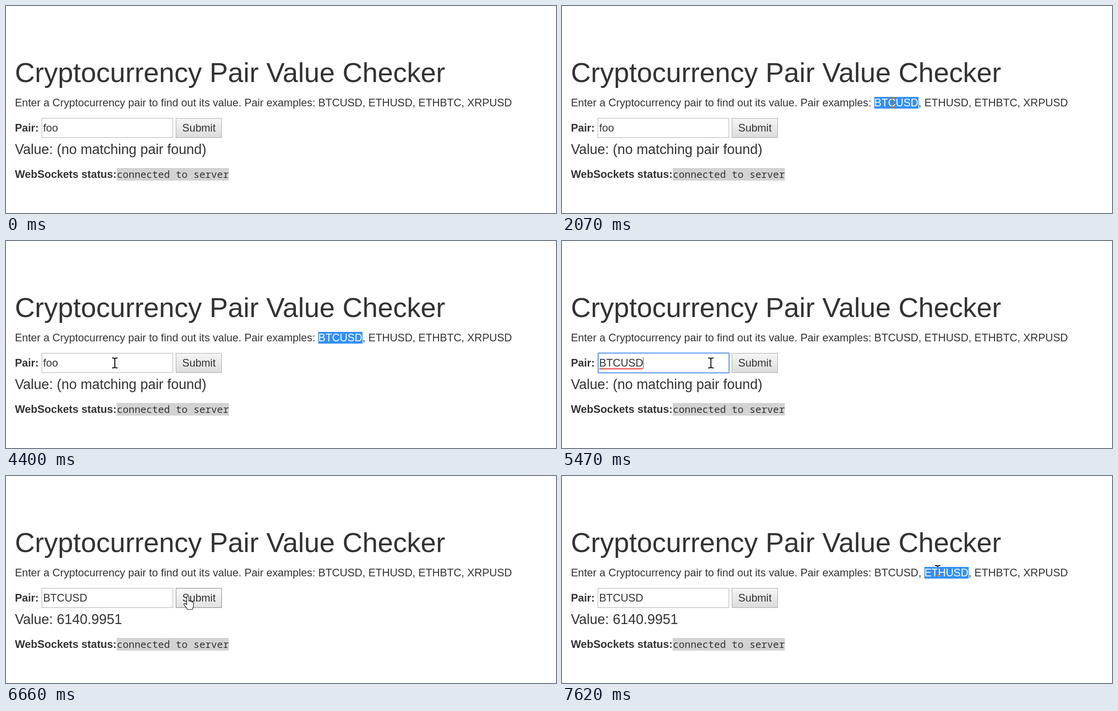
An HTML page for the animation above (8000 ms loop, 1218 px wide and 460 px high).

```html
<!DOCTYPE html>
<html lang="en">
<head>
<meta charset="utf-8">
<title>Pair value checker</title>
<style>
  html, body { margin: 0; width: 100%; height: 100%; overflow: hidden; background: #fff; }
  svg { display: block; width: 100%; height: 100%; }
  text { font: 23.75px "Liberation Sans", Arial, sans-serif; fill: #333; white-space: pre; }
  .title { font-size: 61.1px; }
  .value { font-size: 30.55px; }
  .bold { font-weight: bold; }
  .code { font: 21.75px "Noto Sans Mono", monospace; }
  .marked { fill: #fff; }
  .mark { fill: #3390ff; }
  .beam { fill: none; stroke: #000; stroke-width: 2; }
  .tint { stroke: #b8742c; }
</style>
</head>
<body>
<svg viewBox="0 0 1218 460">
  <defs>
    <linearGradient id="face" x2="0" y2="1">
      <stop stop-color="#f6f6f6"/><stop offset="1" stop-color="#dcdcdc"/>
    </linearGradient>
    <linearGradient id="faceHover" x2="0" y2="1">
      <stop stop-color="#f8f8f8"/><stop offset="1" stop-color="#e2e2e2"/>
    </linearGradient>
    <path id="beamShape" d="M-6-11h4l2 2l2-2h4M-6 11h4l2-2l2 2h4M0-9V9"/>
    <clipPath id="inside"><path id="insidePath"/></clipPath>
    <clipPath id="outside"><path id="outsidePath" clip-rule="evenodd"/></clipPath>
  </defs>

  <text class="title" x="19.7" y="169">Cryptocurrency Pair Value Checker</text>

  <rect id="wordMark" class="mark" y="202" width="98" height="26"/>
  <text x="19.7" y="223">Enter a Cryptocurrency pair to find out its value. Pair examples: <tspan id="btc">BTCUSD</tspan>, <tspan id="eth">ETHUSD</tspan>, ETHBTC, XRPUSD</text>

  <text class="bold" x="19.7" y="279">Pair:</text>
  <rect x="79.5" y="249.5" width="290" height="43" fill="#fff" stroke="#a9a9a9"/>
  <rect id="focus" x="80" y="249" width="290" height="44" rx="1" fill="none" stroke="#4a8cee" stroke-width="2"/>
  <rect id="inputMark" class="mark" x="82" y="258" width="33" height="26"/>
  <text id="input" x="82.2" y="279"></text>
  <path id="squiggle" fill="none" stroke="#f01818" stroke-width="1.4"/>
  <rect id="caret" y="258" width="1" height="26" fill="#333"/>

  <rect id="button" x="376.5" y="249.5" width="101" height="43"/>
  <text x="427.3" y="279" text-anchor="middle">Submit</text>

  <text id="value" class="value" x="19.7" y="329"></text>

  <text class="bold" x="19.7" y="382">WebSockets status:</text>
  <rect x="245" y="360" width="248.5" height="28" fill="#d3d3d3"/>
  <text class="code" x="245.5" y="382">connected to server</text>

  <g id="beam">
    <g clip-path="url(#outside)"><use class="beam" href="#beamShape"/></g>
    <g id="tinted" clip-path="url(#inside)"><use class="beam tint" href="#beamShape"/></g>
  </g>
  <path id="hand" fill="#fff" stroke="#000" stroke-width="1.2" stroke-linejoin="round"
    d="M-3.5 15V2a2.4 2.4 0 0 1 4.8 0v9c0-3 3.6-3 3.6 0v1c0-3 3.6-3 3.6 .5v1c0-3 3-2.5 3 .5v6c0 4-2 6-2.5 9H-2c-1-3-5-7-7-10s1-5 3.5-2.5l2 2z"/>
</svg>
<script>
const LOOP = 8000;
const $ = id => document.getElementById(id);

const easeOut = power => p => 1 - (1 - p) ** power;
const easeInOut = p => p < 0.5 ? 4 * p ** 3 : 1 - (2 - 2 * p) ** 3 / 2;

// Each move starts where the one before it ended
const entry = [1067, 643];
const moves = [
  { from: 860, until: 1540, steps: 10, to: [731, 215], ease: [easeOut(2.5), easeOut(7.4)] },
  { from: 3660, until: 4090, steps: 7, to: [241, 295], ease: [easeInOut, easeInOut] },
  { from: 4240, until: 4400, steps: 3, to: [241, 271], ease: [easeInOut, easeInOut] },
  { from: 5470, until: 6020, steps: 8, to: [402, 268], ease: [easeOut(6), easeInOut] },
  { from: 6660, until: 7390, steps: 10, to: [832, 210], ease: [easeInOut, easeOut(2)] }
];
moves.at(-1).ease[1] = easeInOut;

function pointerAt(t) {
  let point = entry;
  for (const { from, until, steps, to, ease } of moves) {
    if (t < from) break;
    const gap = (until - from) / (steps - 1);
    const progress = Math.min(1, (Math.round((t - from) / gap) + 1) / steps);
    point = point.map((start, axis) => start + (to[axis] - start) * ease[axis](progress));
  }
  return point;
}

const between = (t, from, to) => t >= from && t < to;
const show = (id, on) => $(id).setAttribute("display", on ? "inline" : "none");
const box = (x, y, w, h) => `M${x} ${y}h${w}v${h}h${-w}z`;

function drawPointer(t, wordX) {
  const [x, y] = pointerAt(t);
  const overButton = between(x, 376, 478) && between(y, 249, 293);
  show("beam", !overButton);
  show("hand", overButton);
  $("button").setAttribute("fill", `url(#${overButton ? "faceHover" : "face"})`);
  $("button").setAttribute("stroke", overButton ? "#777" : "#a2a2a2");
  for (const shape of [$("hand"), ...document.querySelectorAll(".beam")])
    shape.setAttribute("transform", `translate(${x} ${y})`);

  // The beam changes colour over marked text
  const arriving = t < 1710;
  const band = arriving ? box(691, 202, 430, 26) : wordX ? box(wordX, 202, 98, 26) : "";
  $("insidePath").setAttribute("d", band || "M0 0");
  $("outsidePath").setAttribute("d", box(0, 0, 1218, 460) + band);
  $("tinted").setAttribute("opacity", arriving ? 0.45 : 1);
}

function draw(t) {
  const btc = between(t, 2070, 4480), eth = t >= 7620;
  const wordX = btc ? 691.5 : eth ? 802.5 : 0;
  show("wordMark", wordX);
  $("wordMark").setAttribute("x", wordX);
  $("btc").classList.toggle("marked", btc);
  $("eth").classList.toggle("marked", eth);

  const pasted = t >= 5130, fooMarked = between(t, 4870, 5130);
  $("input").textContent = pasted ? "BTCUSD" : "foo";
  $("input").classList.toggle("marked", fooMarked);
  show("inputMark", fooMarked);
  show("focus", between(t, 4480, 5860));
  show("squiggle", between(t, 5180, 5860));
  show("caret", between(t, 4480, 5860) && !fooMarked);
  $("caret").setAttribute("x", pasted ? 179.5 : 115);

  $("value").textContent = "Value: " + (t < 6020 ? "(no matching pair found)" : "6140.9951");
  drawPointer(t, wordX);
}

$("squiggle").setAttribute("d", "M82.5 285" + "l2-2l2 2".repeat(24));

const start = performance.now();
function tick() {
  draw((performance.now() - start) % LOOP);
  requestAnimationFrame(tick);
}
tick();
</script>
</body>
</html>
```
